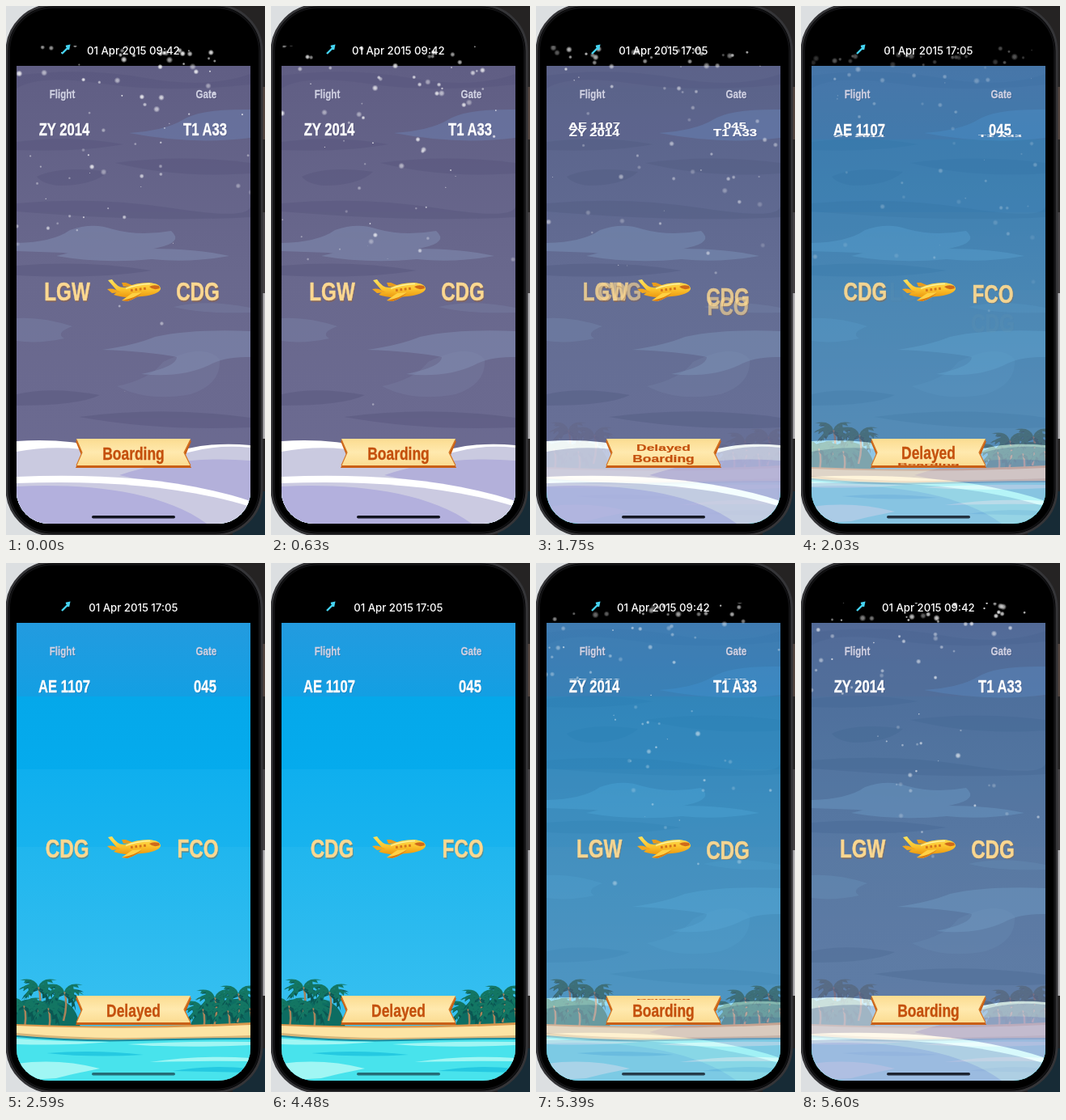
Recreate the animation shown at these times as an HTML page. Size 320x654 px, loop 5.67 s.

```html
<!DOCTYPE html>
<html lang="en">
<head>
<meta charset="utf-8">
<title>Flight board</title>
<style>
html, body { margin: 0; height: 100%; overflow: hidden; background: #000; }
svg { display: block; width: 100%; height: 100%; }
text { text-anchor: middle; }
.narrow { font-family: "Liberation Sans", Arial, sans-serif; font-weight: 700; }
#date { font: 500 13.2px Inter, sans-serif; fill: #fff; }
</style>
</head>
<body>
<svg viewBox="0 0 320 654">
  <defs>
    <linearGradient id="dusk" x2="0" y2="1">
      <stop stop-color="#605e84"/><stop offset=".45" stop-color="#69688d"/><stop offset="1" stop-color="#6c6b92"/>
    </linearGradient>
    <linearGradient id="noon" x2="0" y2="1">
      <stop stop-color="#239bdf"/><stop offset=".16" stop-color="#139fe3"/>
      <stop offset=".16" stop-color="#05a8ea"/><stop offset=".32" stop-color="#05abed"/>
      <stop offset=".32" stop-color="#0fafee"/><stop offset=".49" stop-color="#18b3ee"/>
      <stop offset=".49" stop-color="#20b6ee"/><stop offset=".7" stop-color="#2dbbef"/>
      <stop offset="1" stop-color="#3fc4f1"/>
    </linearGradient>
    <linearGradient id="ribbon" x2="0" y2="1">
      <stop stop-color="#fbdc90"/><stop offset=".5" stop-color="#ffe9ae"/><stop offset="1" stop-color="#fbdc92"/>
    </linearGradient>
    <linearGradient id="gold" x2="0" y2="1">
      <stop stop-color="#ffe45e"/><stop offset=".55" stop-color="#fcc42e"/><stop offset="1" stop-color="#ec980f"/>
    </linearGradient>
    <radialGradient id="flake">
      <stop offset=".35" stop-color="#fff"/><stop offset="1" stop-color="#fff" stop-opacity="0"/>
    </radialGradient>
    <clipPath id="screen"><rect x="13" y="20" width="289" height="620" rx="40"/></clipPath>
    <clipPath id="view"><path d="M13 74H302V640H13Z"/></clipPath>
    <clipPath id="snowArea"><path d="M13 49H302V640H13Z"/></clipPath>
    <path id="leaf" d="M0 0Q10 -9 24 4L18 1L18 5L13 0L11 4L7 0Z"/>
    <g id="fronds">
      <use href="#leaf"/><use href="#leaf" transform="rotate(-30)"/><use href="#leaf" transform="rotate(33)"/>
      <g transform="scale(-1 1)">
        <use href="#leaf"/><use href="#leaf" transform="rotate(-30)"/><use href="#leaf" transform="rotate(33)"/>
      </g>
    </g>
    <g id="palm">
      <path d="M0 0Q5 14 -1 36" fill="none" stroke="#a9835a" stroke-width="2.5"/>
      <use href="#fronds" fill="#0a5752" transform="translate(0 4) rotate(12)"/>
      <use href="#fronds" fill="#137663"/>
    </g>
  </defs>

  <!-- surroundings and phone -->
  <path d="M0 0H160V654H0Z" fill="#dcdfe1"/>
  <path d="M160 0H320V654H160Z" fill="#252323"/>
  <path d="M316 100H320V165H316Z" fill="#51433d"/>
  <path d="M316 255H320V355H316Z" fill="#454244"/>
  <path d="M316 355H320V535H316Z" fill="#b0afb2"/>
  <path d="M280 600H320V654H280Z" fill="#172b36"/>
  <rect x="1" y="-1" width="315" height="655" rx="57" stroke="#353538" stroke-width="3"/>
  <rect x="4" y="2" width="309" height="649" rx="54" stroke="#111113" stroke-width="2"/>

  <g clip-path="url(#screen)">
    <g id="day" clip-path="url(#view)">
      <path d="M13 74H302V640H13Z" fill="url(#noon)"/>
      <path d="M13 546Q25 534 42 544Q60 532 78 546Q88 553 92 575H13Z" fill="#0d6d62"/>
      <path d="M302 542Q282 534 264 545Q240 540 226 575H302Z" fill="#0d6d62"/>
      <use href="#palm" x="22" y="547"/>
      <use href="#palm" x="40" y="524"/>
      <use href="#palm" x="52" y="550"/>
      <use href="#palm" x="72" y="530"/>
      <use href="#palm" x="243" y="551"/>
      <use href="#palm" x="258" y="537"/>
      <use href="#palm" x="274" y="553"/>
      <use href="#palm" x="287" y="532"/>
      <use href="#palm" x="301" y="550"/>
      <path d="M13 570Q150 576 302 568V600H13Z" fill="#d9984d"/>
      <path d="M13 572Q150 578 302 571V600H13Z" fill="#fde4a4"/>
      <path d="M13 581Q90 588 160 587T302 584V640H13Z" fill="#d7b579"/>
      <path d="M13 584Q90 591 160 589T302 587V640H13Z" fill="#198da1"/>
      <path d="M13 586Q90 593 160 591T302 589V640H13Z" fill="#48e3ec"/>
      <g fill="#a0f6f4">
        <path d="M13 588Q70 592 128 592Q75 597 13 595Z"/>
        <path d="M150 595Q220 591 302 592V596Q220 600 150 595Z"/>
        <path d="M13 619Q65 612 116 625Q80 632 62 637L13 640Z"/>
        <path d="M178 617Q240 608 302 612V616Q245 615 178 617Z"/>
      </g>
      <path d="M50 606Q110 601 170 608Q105 612 50 606ZM206 628Q250 620 302 625V630Q250 629 206 628Z" fill="#25c9e1"/>
    </g>

    <g id="night" clip-path="url(#view)">
      <path d="M13 74H302V640H13Z" fill="url(#dusk)"/>
      <g fill="#57567c" opacity=".45">
        <path d="M13 86Q95 75 172 89T302 84V97Q200 108 120 96T13 102Z"/>
        <path d="M13 168Q80 159 145 171Q90 181 13 178Z"/>
        <path d="M38 211Q68 197 126 205Q108 222 65 222Q45 220 38 211Z"/>
        <path d="M135 194Q215 183 302 194V207Q210 213 135 194Z"/>
        <path d="M13 244Q110 235 206 250T302 247V261Q180 268 13 254Z"/>
        <path d="M13 321Q100 314 180 327Q115 338 13 333Z"/>
        <path d="M13 480Q55 470 116 481Q90 494 13 494Z"/>
        <path d="M90 508Q195 494 302 509V521Q190 526 90 508Z"/>
      </g>
      <g fill="#8391b4" opacity=".5">
        <path d="M152 157Q196 154 218 141Q239 127 302 128V163Q230 172 152 157Z" fill="#6c80b0"/>
        <path d="M13 293Q58 292 79 277Q107 267 132 276Q165 285 204 278Q220 292 187 299Q130 314 70 305L13 303Z"/>
        <path d="M62 309Q130 292 178 300Q235 300 276 309Q225 318 180 313Q120 319 62 309Z"/>
        <path d="M70 284Q125 273 176 286Q140 294 70 284Z" opacity=".5"/>
        <path d="M13 386Q45 384 82 396Q60 404 72 411Q40 418 13 414Z" opacity=".6"/>
        <path d="M119 425Q160 419 184 409Q230 399 302 402V434Q270 433 251 444Q217 460 167 455Q211 446 211 434Q175 427 119 425Z"/>
        <path d="M207 372Q247 362 302 373V379Q244 381 207 372Z" opacity=".5"/>
      </g>
      <path d="M194 440Q245 415 264 437Q266 468 228 480Q175 490 137 470Q179 461 194 440Z" fill="#8590b3" opacity=".2"/>
      <path d="M13 538Q70 534 120 546T225 547Q260 539 302 543V640H13Z" fill="#fff"/>
      <path d="M13 551Q65 541 120 552T225 552Q260 542 302 546V640H13Z" fill="#cacae0"/>
      <path d="M140 580Q215 555 302 562V615Z" fill="#b3b0da"/>
      <path d="M13 582C110 578 215 583 302 612V640H13Z" fill="#fff"/>
      <path d="M13 590C110 586 215 592 302 619V640H13Z" fill="#cbcae1"/>
      <path d="M13 594C95 590 190 598 248 640H13Z" fill="#b3b0dd"/>
    </g>
    <rect id="home" x="106" y="630" width="103" height="3.6" rx="1.8" fill="#0a0c16"/>
    <g id="snow" clip-path="url(#snowArea)" fill="url(#flake)"></g>
  </g>

  <!-- status icon, ribbon, plane -->
  <path d="M69 59L77 51M74 50L78 49L77 54" fill="none" stroke="#45d4f2" stroke-width="2.4"/>
  <path d="M86 538H229L222 555L229 571H86L93 555Z" fill="#c95f16"/>
  <path d="M87 535H228L220 552L228 568H87L94 552Z" fill="url(#ribbon)"/>
  <path d="M87 536L94 552L87 568M228 536L220 552L228 568" fill="none" stroke="#d57927" stroke-width="1.2"/>

  <g id="labels" class="narrow"></g>

  <g id="plane">
    <path d="M145 347L143 342L148 342L158 346Z" fill="#e99c1c"/>
    <path d="M126 339L131 338Q138 349 147 348Q161 342 176 342Q191 343 191 350Q188 357 168 359Q146 362 133 357L138 353Z" fill="url(#gold)"/>
    <path d="M125 350Q133 348 142 354L131 355Z" fill="#f3a81e"/>
    <path d="M156 355L168 354Q163 361 150 365L143 364Z" fill="#ffd144"/>
    <path d="M143 364L150 365Q163 361 168 354Q160 361 143 364Z" fill="#d87910"/>
    <path d="M177 347Q182 344 189 346L190 349Q182 352 177 347Z" fill="#cf6a1a"/>
    <path d="M154 351.5L174 349" stroke="#d5751c" stroke-width="3" stroke-dasharray="2.8 2.6"/>
    <path d="M148 349.5Q162 344 178 343.5" fill="none" stroke="#fff29b" stroke-width="1.3"/>
  </g>
  <text id="date" x="157.3" y="59.5"></text>
</svg>

<script>
const LOOP = 5670, TO_DAY = 1600, TO_NIGHT = 4900;
const $ = id => document.getElementById(id);
const clamp = u => Math.max(0, Math.min(1, u));
const easeIn = u => clamp(u) ** 1.7;
const easeOut = u => 1 - (1 - clamp(u)) ** 1.7;
const smooth = u => (u = clamp(u)) * u * (3 - 2 * u);

function add(parent, tag, attrs, text = "") {
  const el = document.createElementNS("http://www.w3.org/2000/svg", tag);
  for (const key in attrs) el.setAttribute(key, attrs[key]);
  el.textContent = text;
  parent.append(el);
  return el;
}

// One condensed cut for every label, centred on its capitals.
const CONDENSED = 0.765;
function place(el, x, y, scaleY = 1, alpha = 1) {
  el.setAttribute("transform", `translate(${x} ${y}) scale(${CONDENSED} ${scaleY})`);
  el.setAttribute("opacity", alpha);
}

function makeText(text, size, fill, shadow) {
  const g = add($("labels"), "g", { "font-size": size });
  if (shadow) add(g, "text", { x: 1.2, y: size * 0.36 + 1.2, fill: shadow }, text);
  add(g, "text", { y: size * 0.36, fill, stroke: fill, "stroke-width": size / 60 }, text);
  return g;
}

const SOFT = "rgba(40,40,80,.25)", BROWN = "rgba(155,95,45,.45)";
place(makeText("Flight", 15.2, "#d0d1e2", SOFT), 69.5, 108.6);
place(makeText("Gate", 15.2, "#d0d1e2", SOFT), 247.3, 108.6);

const label = (texts, x, y, size, fill, shadow, motion) =>
  ({ x, y, ...motion, els: texts.map(s => makeText(s, size, fill, shadow)) });
const labels = [
  label(["ZY 2014", "AE 1107"], 72, 152.4, 21.8, "#fff", SOFT, { flip: 9 }),
  label(["T1 A33", "045"], 246, 152.4, 21.8, "#fff", SOFT, { flip: 9 }),
  label(["LGW", "CDG"], 75.5, 353, 31.6, "#fbd891", BROWN, { dx: 80, dy: 0 }),
  label(["CDG", "FCO"], 237, 353, 31.6, "#fbd891", BROWN, { dx: 0, dy: 50 }),
  label(["Boarding", "Delayed"], 157.5, 553, 22.8, "#c4500d", "", { flip: 14 })
];

function drawLabel({ x, y, flip, dx, dy, els }, now, ms) {
  const next = els[now], prev = els[1 - now];
  if (flip) {
    const p = easeOut(ms / 500), side = now ? 1 : -1;
    place(next, x, y - side * flip * (1 - p), 0.1 + 0.9 * p);
    place(prev, x, y + side * flip * p, 1 - 0.9 * p, p < 1 ? 1 : 0);
  } else {
    const rest = Math.exp(-ms / 143), p = easeIn(ms / 500);
    place(next, x + dx * rest, y + dy * rest, 1, 1 - rest);
    place(prev, x + dx * p, y + dy * p, 1, clamp(1 - 1.25 * p));
  }
}

// Snow: a steady emitter above the view, pulled down by gravity.
const RATE = 25, LIFE = 3.6;
const flakes = Array.from({ length: Math.ceil(RATE * LIFE) }, () => add($("snow"), "circle", {}));
const rand = (i, k) => {
  const v = Math.sin(i * 127.1 + k * 311.7) * 43758.5453;
  return v - Math.floor(v);
};

function drawSnow(sec) {
  const last = Math.floor(sec * RATE);
  flakes.forEach((el, k) => {
    const i = last - k, age = sec - i / RATE;
    const speed = 14 + 45 * (rand(i, 1) * 2 - 1);
    const angle = Math.PI + (rand(i, 2) - 0.5) * Math.PI / 2;
    const scale = 0.4 + rand(i, 3) * 0.9 - 0.07 * age;
    el.setAttribute("cx", 13 + 270 * rand(i, 4) + speed * Math.cos(angle) * age + 3.5 * age * age);
    el.setAttribute("cy", 30 + 35 * rand(i, 5) + speed * Math.sin(angle) * age + 24 * age * age);
    el.setAttribute("r", Math.max(0, scale * 3.6));
    el.setAttribute("opacity", clamp(1 - 0.5 * rand(i, 6) - 0.1 * age));
  });
}

function draw(time) {
  const t = time % LOOP;
  const now = t >= TO_DAY && t < TO_NIGHT ? 1 : 0;
  const ms = now ? t - TO_DAY : t >= TO_NIGHT ? t - TO_NIGHT : LOOP;
  const fade = smooth(ms / 1000), snow = easeOut(ms / 1000);
  const dark = now ? 1 - fade : fade;
  $("night").setAttribute("opacity", dark);
  $("home").setAttribute("opacity", 0.55 + 0.4 * dark);
  $("snow").setAttribute("opacity", now ? 1 - snow : snow);
  $("date").textContent = "01 Apr 2015 " + (now ? "17:05" : "09:42");
  labels.forEach(l => drawLabel(l, now, ms));
  drawSnow(t / 1000);
}

const start = performance.now();
function tick() {
  draw(performance.now() - start);
  requestAnimationFrame(tick);
}
tick();
</script>
</body>
</html>
```
